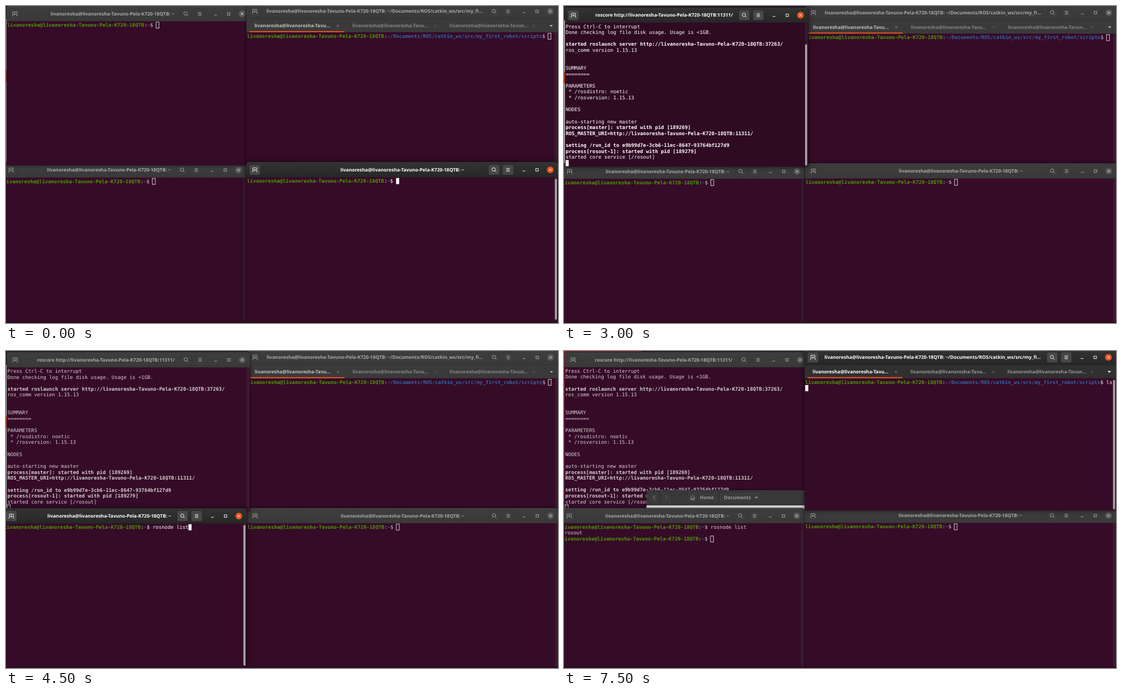
Recreate the animation shown at these times as an HTML page with a canvas. Size 987 by 567 pixels, loop 8 s.

```html
<!DOCTYPE html>
<html lang="en">
<head>
<meta charset="utf-8">
<title>Four terminals</title>
<style>
  html, body { margin: 0; width: 100%; height: 100%; overflow: hidden; background: #2a0d20; }
  canvas { display: block; }
</style>
</head>
<body>
<canvas id="stage" width="987" height="567"></canvas>
<script>
const ctx = document.getElementById('stage').getContext('2d');
ctx.textRendering = 'geometricPrecision';

const CELL = 5.33, ROW = 10.63, HEADER = 27, TABS = 24.4;
const MONO = '8.86px "DejaVu Sans Mono", monospace';
const SANS = 'bold 8.45px "Noto Sans", sans-serif';
const GREEN = '#4e9a06', BLUE = '#3465a4', ORANGE = '#e95420';

const HOST = 'livanoresha-Tavuno-Pela-K720-18QTB';
const USER = 'livanoresha@' + HOST;
const HOME_TITLE = USER + ': ~';

// A line is a list of [text, colour, bold] runs.
const prompt = (command = '', path = '~') =>
  [[USER, GREEN, true], [':'], [path, BLUE, true], ['$ ' + command]];
const plain = text => [[text]];
const bold = text => [[text, null, true]];
const scriptsPrompt = command => prompt(command, '~/Documents/ROS/catkin_ws/src/my_first_robot/scripts');

const ROSCORE = [
  plain('Press Ctrl-C to interrupt'),
  plain('Done checking log file disk usage. Usage is <1GB.'),
  [],
  bold(`started roslaunch server http://${HOST}:37263/`),
  plain('ros_comm version 1.15.13'),
  [], [],
  plain('SUMMARY'),
  plain('========'),
  [],
  plain('PARAMETERS'),
  plain(' * /rosdistro: noetic'),
  plain(' * /rosversion: 1.15.13'),
  [],
  plain('NODES'),
  [],
  plain('auto-starting new master'),
  bold('process[master]: started with pid [189269]'),
  bold(`ROS_MASTER_URI=http://${HOST}:11311/`),
  [],
  bold('setting /run_id to e9b99d7e-3cb6-11ec-8647-93764bf127d9'),
  bold('process[rosout-1]: started with pid [189279]'),
  plain('started core service [/rosout]'),
  []
];

const WINDOWS = {
  core:    { left: 0.8,   right: 436,   top: 0,     bottom: 285 },
  scripts: { left: 429.8, right: 987.2, top: -4.5,  bottom: 283.5, tabs: true },
  nodes:   { left: -5.9,  right: 429.8, top: 279.5, bottom: 570 },
  spare:   { left: 429.8, right: 987.2, top: 279,   bottom: 570 }
};

// The picture drifts a little at each step: dx, dy for the upper row, low for the lower row.
const SCENES = [
  { at: 0,    dx: 0,   dy: 0,   low: 0,   order: ['nodes', 'core', 'scripts', 'spare'] },
  { at: 1500, dx: 1,   dy: 1.8, low: 1.3, order: ['nodes', 'scripts', 'spare', 'core'] },
  { at: 3000, dx: 0.9, dy: 2.5, low: 2.2, order: ['nodes', 'scripts', 'spare', 'core'] },
  { at: 4500, dx: 0.5, dy: 1.9, low: 1.7, order: ['scripts', 'spare', 'core', 'nodes'] },
  { at: 6000, dx: 1,   dy: 2.8, low: 2.4, order: ['core', 'files', 'scripts', 'spare', 'nodes'] },
  { at: 7500, dx: 0.3, dy: 1.8, low: 1.3, order: ['core', 'files', 'nodes', 'spare', 'scripts'] }
];

function linesOf(name, time) {
  if (name === 'core')
    return time >= 3000 ? ROSCORE : [prompt(time >= 1500 ? 'roscore' : '')];
  if (name === 'nodes')
    return time >= 6000 ? [prompt('rosnode list'), plain('/rosout'), prompt()]
                        : [prompt(time >= 4500 ? 'rosnode list' : '')];
  if (name === 'scripts')
    return time >= 7500 ? [scriptsPrompt('ls'), []] : [scriptsPrompt()];
  return [prompt()];
}

function titleOf(name, time) {
  if (name === 'scripts') return USER + ': ~/Documents/ROS/catkin_ws/src/my_fi…';
  if (name === 'core' && time >= 3000) return `roscore http://${HOST}:11311/`;
  return HOME_TITLE;
}

function rect(x, y, w, h, colour) {
  ctx.fillStyle = colour;
  ctx.fillRect(x, y, w, h);
}

function rounded(x, y, w, h, radii, colour) {
  ctx.fillStyle = colour;
  ctx.beginPath();
  ctx.roundRect(x, y, w, h, radii);
  ctx.fill();
}

function text(string, x, y, colour, font = SANS) {
  ctx.font = font;
  ctx.fillStyle = colour;
  ctx.fillText(string, x, y);
}

// Strokes polylines given relative to (x, y).
function strokes(x, y, colour, ...paths) {
  ctx.strokeStyle = colour;
  ctx.lineWidth = 1;
  ctx.beginPath();
  for (const path of paths)
    path.forEach(([px, py], i) => ctx[i ? 'lineTo' : 'moveTo'](x + px, y + py));
  ctx.stroke();
}

function cross(x, y, size, colour) {
  strokes(x, y, colour, [[-size, -size], [size, size]], [[-size, size], [size, -size]]);
}

function arrowDown(x, y, colour) {
  ctx.fillStyle = colour;
  ctx.beginPath();
  ctx.moveTo(x - 3, y - 1.5);
  ctx.lineTo(x + 3, y - 1.5);
  ctx.lineTo(x, y + 1.7);
  ctx.fill();
}

function button(x, y, active) {
  rounded(x - 10.3, y - 9.8, 20.6, 19.6, 3, active ? '#222' : '#343434');
  rounded(x - 9.6, y - 9.1, 19.2, 18.2, 2.5, active ? '#474747' : '#3c3c3c');
}

function drawHeader(win, title, active) {
  const { left, right, top } = win, y = top + 14;
  const ink = active ? '#f4f4f4' : '#a3a3a0';
  const fill = ctx.createLinearGradient(0, top, 0, top + HEADER);
  fill.addColorStop(0, active ? '#333' : '#3e3e3e');
  fill.addColorStop(1, active ? '#272727' : '#393939');
  rounded(left, top, right - left, HEADER + 0.3, [5, 5, 0, 0], fill);

  const plusX = left + 15, searchX = right - 114.5, menuX = right - 89.5;
  for (const x of [plusX, searchX, menuX]) button(x, y, active);
  strokes(plusX, y, ink,
    [[-5, 3.5], [-3.5, 3.5], [-3.5, -3.5], [3.5, -3.5], [3.5, 3.5], [5, 3.5]],
    [[-2, 0.5], [2, 0.5]], [[0, -1.5], [0, 2.5]]);
  strokes(searchX, y, ink, [[1.5, 1.5], [4, 4]]);
  ctx.beginPath();
  ctx.arc(searchX - 0.7, y - 0.7, 3, 0, 7);
  ctx.stroke();
  strokes(menuX, y, ink, ...[-2.5, 0, 2.5].map(dy => [[-3, dy], [3, dy]]));
  strokes(right - 61.3, y, ink, [[-2.5, 2.2], [2.5, 2.2]]);
  ctx.strokeRect(right - 40, y - 2.2, 4.5, 4.5);
  ctx.fillStyle = active ? ORANGE : '#585858';
  ctx.beginPath();
  ctx.arc(right - 14, y, 6, 0, 7);
  ctx.fill();
  cross(right - 14, y, 2.2, active ? '#fff' : '#d8d8d8');

  ctx.font = SANS;
  const width = ctx.measureText(title).width;
  const centre = Math.min((left + right) / 2, right - 135 - width / 2);
  text(title, centre - width / 2, y + 2.8, active ? '#fff' : '#a8a8a5');
}

function drawTabs(win, active) {
  const { left, right } = win, y = win.top + HEADER, middle = y + 13;
  rect(left, y, right - left, TABS, active ? '#303030' : '#3a3a3a');
  rect(left, y, right - left, 0.7, active ? '#222' : '#333');
  rect(left + 5, y + TABS - 2, 170, 2, ORANGE);
  [[14.5, 'Tavu…', 163.5], [189.5, 'Tavu…', 338], [363, 'Tavun…', 514]].forEach(([x, end, closeX], i) => {
    const colour = i ? (active ? '#969692' : '#858582') : (active ? '#fff' : '#c0c0bd');
    text('livanoresha@livanoresha-' + end, left + x, middle + 2.8, colour);
    cross(left + closeX, middle, 1.9, i ? '#606060' : '#8a8a8a');
  });
  arrowDown(left + 545, middle, active ? '#fff' : '#b5b5b2');
}

function drawLines(lines, x, y, active) {
  const ink = active ? '#fff' : '#d3cfd1';
  let column;
  lines.forEach((line, row) => {
    column = 0;
    for (const [string, colour, heavy] of line) {
      text(string, x + column * CELL, y + row * ROW + 2.8, colour || ink, (heavy ? 'bold ' : '') + MONO);
      column += string.length;
    }
  });
  const cx = x + column * CELL, cy = y + (lines.length - 1) * ROW - 5.6;
  if (active) {
    rect(cx, cy, 5.5, 11, '#fff');
  } else {
    ctx.strokeStyle = ink;
    ctx.lineWidth = 1;
    ctx.strokeRect(cx - 0.2, cy + 0.2, 5.3, 10.8);
  }
}

function drawTerminal(name, time, active) {
  const win = WINDOWS[name], { left, right, top, bottom, tabs } = win;
  const contentTop = top + HEADER + (tabs ? TABS : 0);
  const contentBottom = Math.min(bottom, 563);
  ctx.save();
  ctx.shadowColor = 'rgba(0,0,0,.65)';
  ctx.shadowBlur = active ? 9 : 4;
  rounded(left, top, right - left, bottom - top, [5, 5, 0, 0],
    active && name === 'core' ? '#2f0a23' : '#360b28');
  ctx.restore();

  ctx.save();
  ctx.beginPath();
  ctx.rect(left, top, right - left, bottom - top);
  ctx.clip();
  drawHeader(win, titleOf(name, time), active);
  if (tabs) drawTabs(win, active);
  drawLines(linesOf(name, time), left + 1.2, contentTop + 7.2, active);

  rect(right - 6, contentTop, 5, contentBottom - contentTop, 'rgba(70,65,68,.3)');
  if (active) {
    const barTop = name === 'core' && time >= 3000 ? contentTop + 39 : contentTop + 3;
    rounded(right - 5.8, barTop, 3.6, contentBottom - 2 - barTop, 2, '#aaa4a7');
  }
  ctx.restore();
}

function drawFiles() {
  const ink = '#999996', x = 147.3, y = 247.2;
  ctx.save();
  ctx.shadowColor = 'rgba(0,0,0,.6)';
  ctx.shadowBlur = 5;
  rect(x, y, 300, 40, '#383838');
  ctx.restore();
  rect(x, y + 27.3, 300, 9, '#e9e7e5');
  for (const [dx, width] of [[4, 20.5], [25, 20.5], [73, 56], [129.5, 77]]) {
    rounded(x + dx, y + 3, width, 21, 3, '#303030');
    rounded(x + dx + 0.7, y + 3.7, width - 1.4, 19.6, 2.5, '#3b3b3b');
  }
  const middle = y + 13.3;
  strokes(x + 14, middle, ink, [[1.5, -4], [-2, 0], [1.5, 4]]);
  strokes(x + 35, middle, '#606060', [[-1.5, -4], [2, 0], [-1.5, 4]]);
  strokes(x + 82.5, middle, ink,
    [[-4.5, 0.5], [0, -4], [4.5, 0.5]],
    [[-3, 0], [-3, 4], [-1, 4], [-1, 1], [1, 1], [1, 4], [3, 4], [3, 0]]);
  text('Home', x + 95.5, middle + 2.8, ink);
  text('Documents', x + 138.5, middle + 2.8, ink);
  arrowDown(x + 196.5, middle, ink);
}

function drawDesktop(time, { dx, dy }) {
  rect(0, 0, 987, 567, '#2a2729');
  const edge = dx + 1;
  if (time < 6000) {
    rect(0, 23 + dy, edge, 257, '#f4f2f3');
    rect(0, 115 + dy, edge, 21, ORANGE);
  } else {
    const glow = ctx.createLinearGradient(0, 0, 0, 282);
    glow.addColorStop(0, '#c92a38');
    glow.addColorStop(0.5, '#8c2859');
    glow.addColorStop(1, '#5c2346');
    rect(0, 0, edge, 282, glow);
    rect(0, 0, time < 7500 ? 111 : 138, dy - 0.8, '#c92a32');
  }
}

function draw(time) {
  const scene = SCENES.findLast(s => time >= s.at);
  const front = scene.order.at(-1);
  drawDesktop(time, scene);
  for (const name of scene.order) {
    const lower = name === 'nodes' || name === 'spare';
    ctx.save();
    ctx.translate(scene.dx, lower ? scene.low : scene.dy);
    if (name === 'files') drawFiles();
    else drawTerminal(name, time, name === front);
    ctx.restore();
  }
  rect(0, 564.5, 987, 3, '#2a0d20');
}

const start = performance.now();
function tick() {
  draw((performance.now() - start) % 8000);
  requestAnimationFrame(tick);
}
tick();
</script>
</body>
</html>
```
